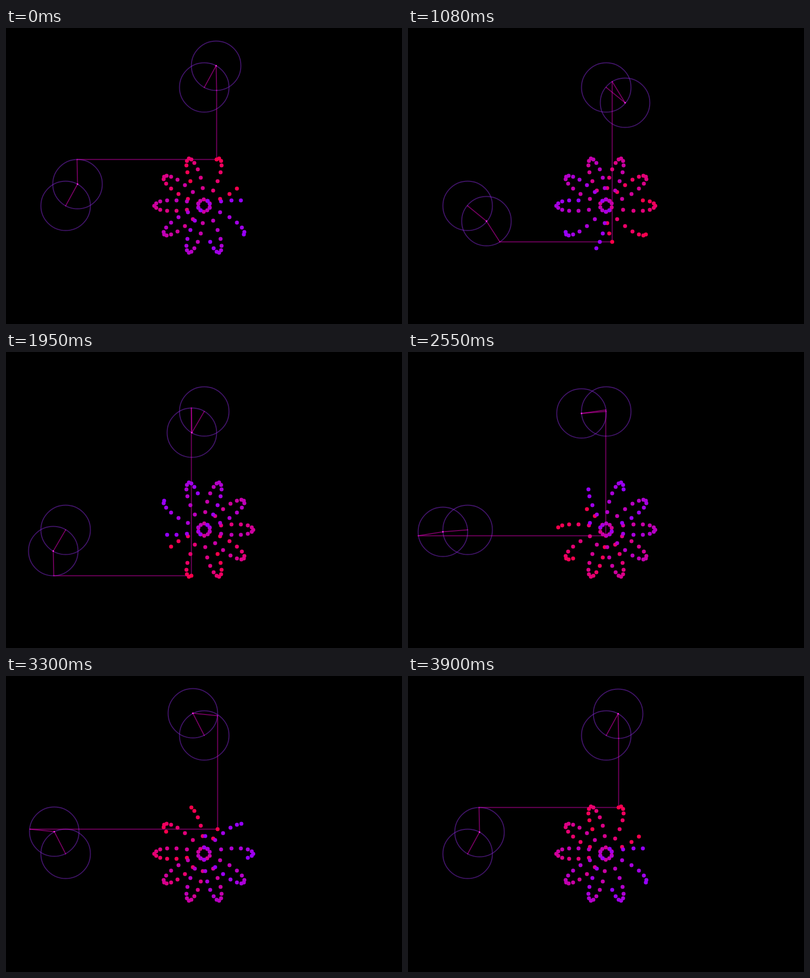
Write an HTML page with a canvas that moves like this. It is 800 by 600 pixels and loops after 3.93 s.

```html
<!DOCTYPE html>
<html lang="en">
<head>
<meta charset="utf-8">
<title>Rose drawn by two linkages</title>
<style>
  html, body { margin: 0; width: 100%; height: 100%; overflow: hidden; background: #000; }
  canvas { display: block; }
</style>
</head>
<body>
<canvas id="stage" width="800" height="600"></canvas>
<script>
const ctx = document.getElementById("stage").getContext("2d");

const TICK = 30, TICKS = 131;      // the last tick repeats the first pose
const CYCLE = 130, START = 108;
const RADIUS = 50, RATIO = -31;    // outer arm turns 31 times backwards per cycle
const TRAIL = 98;
const LEFT = { x: 120, y: 360 }, TOP = { x: 400, y: 120 };
const NEWEST = [255, 0, 72], OLDEST = [148, 0, 255];

const angle = n => n * 2 * Math.PI / CYCLE;

// Snap to the centre of a whole pixel.
const snap = (x, y) => ({ x: Math.floor(x - 1e-6) + 0.5, y: Math.floor(y + 1e-6) + 0.5 });

function linkage(base, n, turn) {
  const a = angle(n), b = angle(RATIO * n) + turn;
  const hx = base.x + RADIUS * Math.cos(a), hy = base.y + RADIUS * Math.sin(a);
  return {
    base: snap(base.x + 0.1, base.y),
    hinge: snap(hx, hy),
    tip: snap(hx + RADIUS * Math.cos(b), hy + RADIUS * Math.sin(b))
  };
}

function penAt(n) {
  return { x: linkage(TOP, n, 0).tip.x, y: linkage(LEFT, n, Math.PI).tip.y };
}

function trailColor(age) {
  const k = age / (TRAIL - 1);
  return `rgb(${NEWEST.map((c, i) => Math.round(c + (OLDEST[i] - c) * k))})`;
}

function ring(p) {
  ctx.strokeStyle = "rgba(130, 40, 210, 0.5)";
  ctx.beginPath();
  ctx.arc(p.x, p.y, RADIUS, 0, 2 * Math.PI);
  ctx.stroke();
}

function line(p, q) {
  ctx.strokeStyle = "rgba(255, 0, 210, 0.45)";
  ctx.beginPath();
  ctx.moveTo(p.x, p.y);
  ctx.lineTo(q.x, q.y);
  ctx.stroke();
}

function dot(p, r, color) {
  ctx.fillStyle = color;
  ctx.beginPath();
  ctx.arc(p.x, p.y, r, 0, 2 * Math.PI);
  ctx.fill();
}

function drawLinkage(arm, pen) {
  ring(arm.base);
  ring(arm.hinge);
  line(arm.base, arm.hinge);
  line(arm.hinge, arm.tip);
  line(arm.tip, pen);
  dot(arm.base, 1, "rgba(255, 0, 220, 0.4)");
  dot(arm.tip, 1, "rgba(255, 0, 220, 0.4)");
  ctx.fillStyle = "rgba(255, 40, 230, 0.85)";
  ctx.fillRect(arm.hinge.x - 1.5, arm.hinge.y - 1.5, 3, 3);
}

function draw(time) {
  const n = START + Math.floor(time / TICK) % TICKS;
  const pen = penAt(n);
  ctx.fillStyle = "#000";
  ctx.fillRect(0, 0, 800, 600);
  ctx.lineWidth = 2;
  ctx.lineCap = "round";
  drawLinkage(linkage(LEFT, n, Math.PI), pen);
  drawLinkage(linkage(TOP, n, 0), pen);
  for (let age = 0; age < TRAIL; age++) dot(penAt(n - age), 4, trailColor(age));
}

const began = performance.now();
function loop() {
  draw(performance.now() - began);
  requestAnimationFrame(loop);
}
loop();
</script>
</body>
</html>
```
